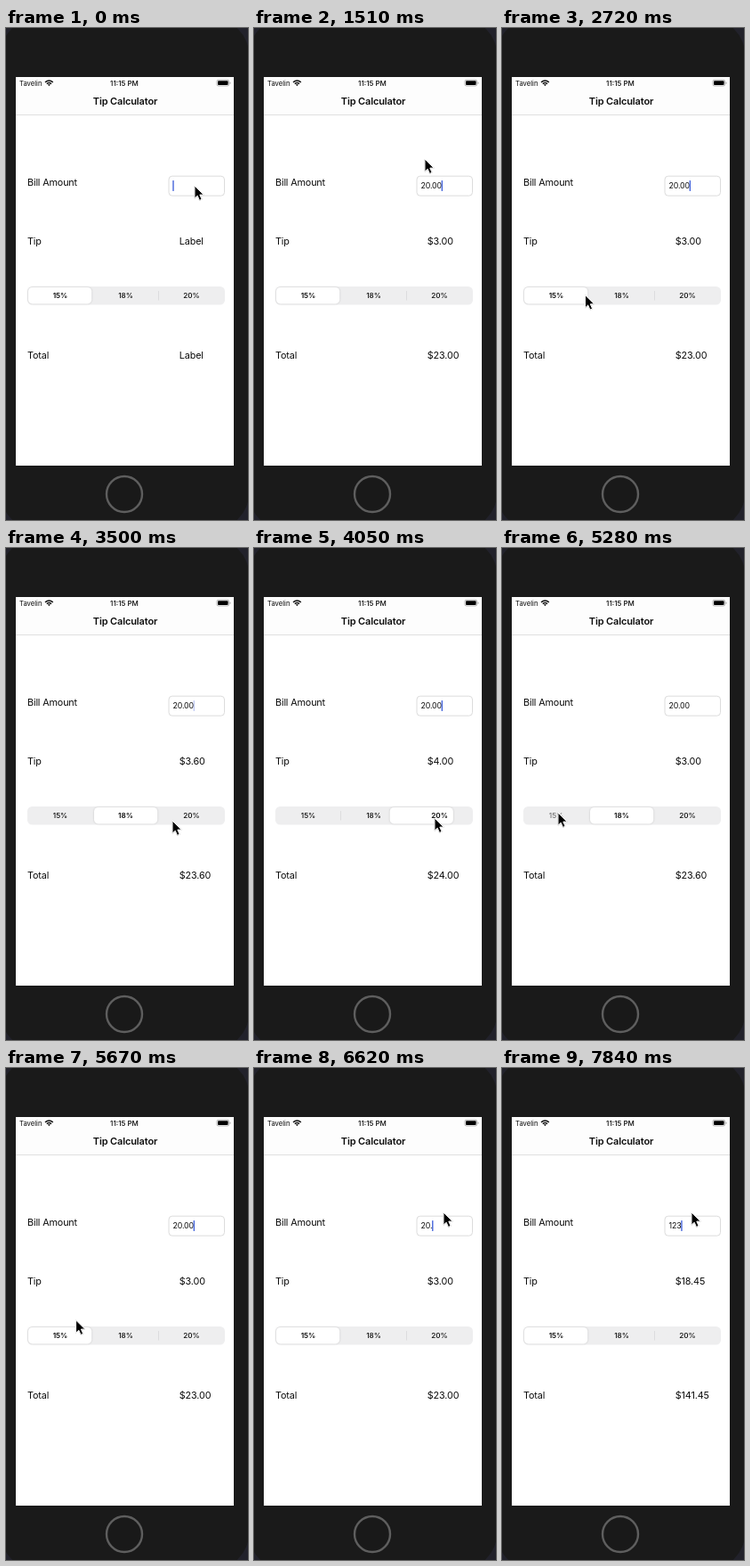
Animation of 272 by 552 pixels, one loop 8000 ms. Source, as an HTML page:

```html
<!DOCTYPE html>
<html lang="en">
<head>
<meta charset="utf-8">
<title>Tip Calculator</title>
<style>
  html, body { margin: 0; width: 100%; height: 100%; overflow: hidden; background: #1a1a1a; }
  svg { display: block; width: 272px; height: 552px; }
  text { font-family: Inter, "Liberation Sans", sans-serif; fill: #0c0c0c; white-space: pre; }
  .label { font-size: 10.8px; letter-spacing: -.15px; }
  .title { font-size: 11px; font-weight: 600; letter-spacing: -.13px; }
  .status { font-size: 7.7px; }
  .clock { font-size: 8px; font-weight: 500; }
  .bill { font-size: 8.8px; letter-spacing: -.15px; }
  .seg { font-size: 8.2px; font-weight: 500; }
  .mid { text-anchor: middle; }
  #thumb { filter: drop-shadow(0 .6px 1px rgba(0, 0, 0, .17)); }
  #cursor { filter: drop-shadow(0 .5px .6px rgba(0, 0, 0, .35)); }
</style>
</head>
<body>
<svg viewBox="0 0 272 552">
  <rect width="272" height="552" fill="#22222b"/>
  <rect x="-6" y="-10" width="279" height="572" rx="40" fill="#1a1a1a"/>
  <circle cx="133" cy="523" r="20" fill="#191919" stroke="#5e5e5e" stroke-width="2.4"/>
  <rect x="11" y="55" width="245" height="436" fill="#fff"/>
  <rect x="11" y="55" width="245" height="42" fill="#fdfdfd"/>
  <rect x="11" y="97" width="245" height=".8" fill="#d9d9d9"/>

  <text class="status" x="15" y="64.5">Tavelin</text>
  <g fill="none" stroke="#111" stroke-width="1.4">
    <path d="M44 60.9q4.4-3.8 8.8 0M45.8 62.7q2.6-2.2 5.2 0"/>
    <path d="M47 63.6q1.4-1.1 2.8 0L48.4 65.2z" fill="#111" stroke="none"/>
  </g>
  <text class="clock mid" x="133" y="64.5">11:15 PM</text>
  <rect x="236.9" y="58.2" width="13.8" height="6.8" rx="1.9" fill="#fff" stroke="#999" stroke-width=".7"/>
  <rect x="238" y="59.3" width="11.6" height="4.6" rx="1" fill="#000"/>
  <rect x="251.5" y="60.5" width=".9" height="2.2" rx=".4" fill="#999"/>
  <text class="title mid" x="134" y="86.2">Tip Calculator</text>

  <text class="label" x="24" y="177">Bill Amount</text>
  <text class="label" x="24" y="243">Tip</text>
  <text class="label" x="24" y="371">Total</text>
  <text class="label" id="tip" x="194.8" y="243"></text>
  <text class="label" id="total" x="194.8" y="370.8"></text>

  <rect x="183" y="166.2" width="62.5" height="22" rx="3.8" fill="#fff" stroke="#dcdcdc"/>
  <text class="bill" id="bill" x="187.5" y="180.4"></text>
  <rect id="caret" y="171" width="1.4" height="12" rx=".6" fill="#4565dc"/>

  <rect x="24" y="290" width="222" height="20.6" rx="5.4" fill="#eeeeef"/>
  <rect class="divider" x="97" y="295" width=".8" height="10.5" fill="#d8d8da"/>
  <rect class="divider" x="171" y="295" width=".8" height="10.5" fill="#d8d8da"/>
  <rect id="thumb" y="291" width="71.2" height="18.4" rx="4.6" fill="#fff"/>
  <text class="seg mid" x="61" y="303.2">15%</text>
  <text class="seg mid" x="134.5" y="303.2">18%</text>
  <text class="seg mid" x="208.5" y="303.2">20%</text>

  <path id="cursor" d="M0 0V14.2L3.2 11.2 5.5 16.4 8.1 15.3 5.8 10.1H10.2Z" fill="#000" stroke="#fff"/>
</svg>
<script>
const LOOP = 8000;
const RATES = [.15, .18, .2];
const $ = id => document.getElementById(id);
const segs = [...document.querySelectorAll('.seg')];
const dividers = [...document.querySelectorAll('.divider')];
const clamp = (v, lo, hi) => Math.min(hi, Math.max(lo, v));
const smooth = k => (k = clamp(k, 0, 1), k * k * (3 - 2 * k));

// The screen refreshes in evenly spaced bursts: start, end, number of refreshes
const ticks = [[120, 270, 2], [670, 1220, 4], [1510, 1510, 1], [2180, 3110, 8], [3230, 4200, 8],
  [4320, 5280, 8], [5430, 6090, 6], [6370, 6920, 4], [7450, 7840, 4]]
  .flatMap(([start, end, n]) => Array.from({ length: n },
    (_, i) => Math.round(start + (end - start) * i / Math.max(1, n - 1))));
const SLACK = 10;

const moves = [
  { from: 40, to: 270, x: 192, y: 147 },
  { from: 2080, to: 2760, x: 92, y: 302 },
  { from: 2800, to: 3110, x: 124, y: 304 },
  { from: 3200, to: 3500, x: 187, y: 306 },
  { from: 3500, to: 3780, x: 203, y: 303 },
  { from: 4200, to: 4590, x: 136, y: 303 },
  { from: 4800, to: 5280, x: 63, y: 297 },
  { from: 5430, to: 6090, x: 213, y: 162 },
];

const taps = [{ at: 3100, seg: 1 }, { at: 3780, seg: 2 }, { at: 4590, seg: 1 }, { at: 5140, seg: 0 }];
const PRESS = 240, TIP_LAG = 130, TOTAL_LAG = 270, SLIDE_LAG = 150, SLIDE = 200;

function pointer(t) {
  let x = 212, y = 177;
  for (const m of moves) {
    const k = smooth((t - m.from) / (m.to - m.from));
    x += (m.x - x) * k;
    y += (m.y - y) * k;
  }
  return [x, y];
}

// How many of n keys have been struck, evenly from start to end
const struck = (t, start, end, n) => clamp(1 + Math.floor((t - start) / (end - start) * (n - 1)), 0, n);

function billAt(t) {
  if (t < 1510) return '20.'.slice(0, struck(t, 670, 1220, 3));
  if (t < 7450) return '20.00'.slice(0, 5 - struck(t, 6370, 6920, 5));
  return '123'.slice(0, struck(t, 7450, 7840, 3));
}

const rateAt = t => RATES[taps.findLast(tap => tap.at <= t)?.seg ?? 0];
const money = v => '$' + v.toFixed(2);

// Blinks while no keys are being struck
function caretAt(t) {
  if (t <= 2180 || t >= 6370) return 1;
  const phase = (t + 510) % 1000;
  return phase < 650 ? Math.min(1, phase / 50) : 0;
}

function draw(t) {
  const bill = billAt(t), amount = +bill;
  const untouched = t < 670;
  $('bill').textContent = bill;
  $('tip').textContent = untouched ? 'Label' : money(amount * rateAt(t - TIP_LAG));
  $('total').textContent = untouched ? 'Label' : money(amount * (1 + rateAt(t - TOTAL_LAG)));

  const width = bill ? $('bill').getComputedTextLength() : 0;
  $('caret').setAttribute('x', 187.3 + width);
  $('caret').setAttribute('opacity', caretAt(t));

  const pos = taps.reduce((p, tap) => p + (tap.seg - p) * smooth((t - tap.at - SLIDE_LAG) / SLIDE), 0);
  const pressed = taps.find(tap => t >= tap.at && t < tap.at + PRESS);
  $('thumb').setAttribute('x', 25 + 74 * pos);
  segs.forEach((seg, i) => {
    seg.style.fontWeight = Math.round(pos) === i ? 600 : 500;
    seg.style.opacity = pressed?.seg === i ? .55 : 1;
  });
  dividers.forEach((line, i) => line.style.opacity = Math.abs(pos - i - .5) > .55 ? 1 : 0);
  $('cursor').setAttribute('transform', `translate(${pointer(t)})`);
}

const start = performance.now();
let shown = -1;
function frame() {
  const now = (performance.now() - start) % LOOP;
  const tick = ticks.findLast(t => t <= now + SLACK) ?? 0;
  if (tick !== shown) draw(shown = tick);
  requestAnimationFrame(frame);
}
frame();
</script>
</body>
</html>
```
